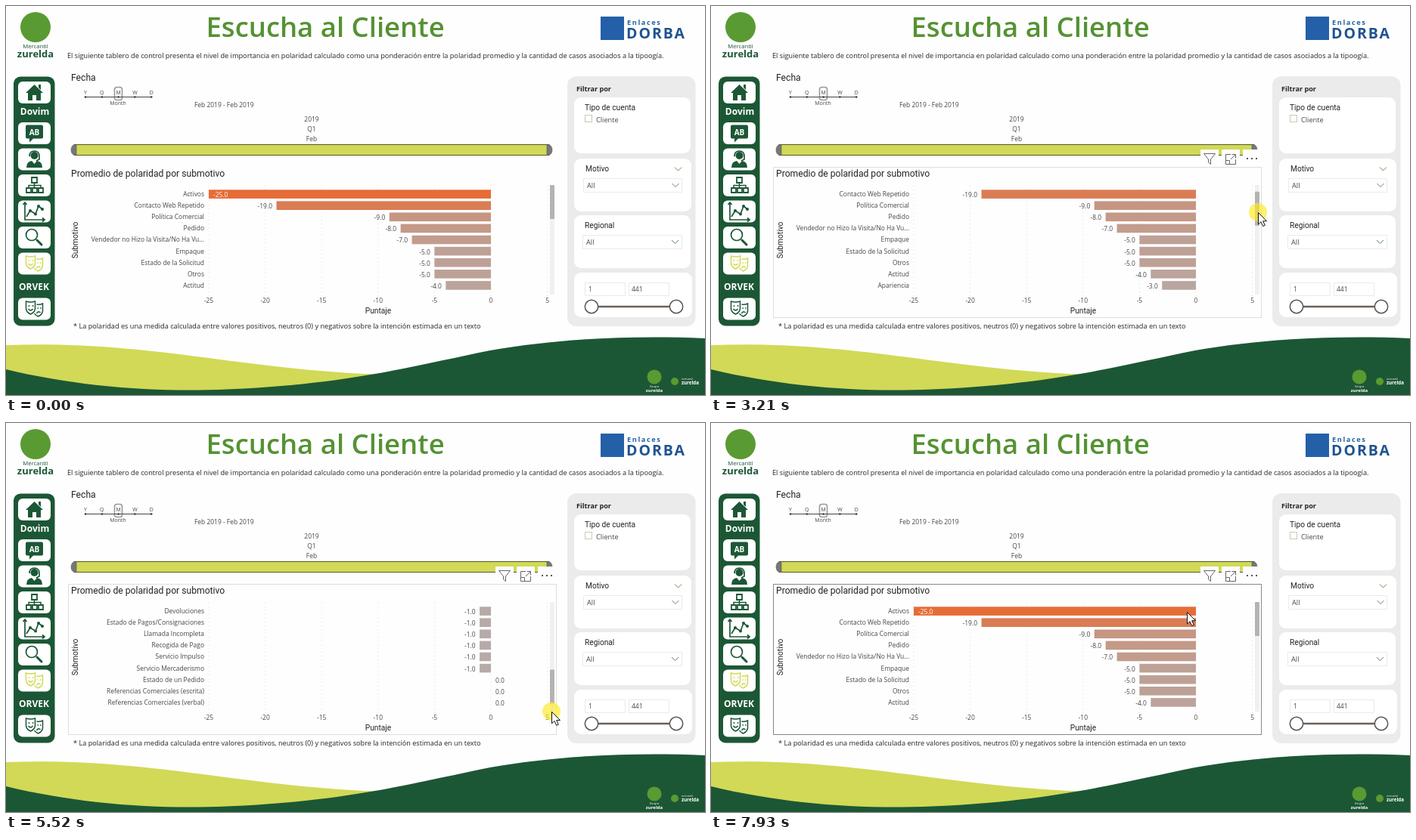
An HTML page that plays this animation: 924x515 px, repeating every 8 s.

```html
<!DOCTYPE html>
<html lang="es">
<head>
<meta charset="utf-8">
<title>Escucha al Cliente</title>
<style>
  html, body { margin: 0; width: 100%; height: 100%; overflow: hidden; background: #fefefe; }
  svg { display: block; width: 100vw; height: 100vh; }
  text { font-family: "Open Sans", "Noto Sans", sans-serif; fill: #252423; }
  .din { font-family: Roboto, "Liberation Sans", sans-serif; font-size: 10.2px; }
  .head { font-size: 12.15px; }
  .small { font-size: 8.45px; fill: #484644; }
  .tiny { font-size: 6.9px; fill: #484644; }
  .note { font-size: 9.16px; }
  .item { font-size: 9.2px; fill: #484644; }
  .bold { font-weight: 700; }
  .mid { text-anchor: middle; }
  .end { text-anchor: end; }
  .white { fill: #fff; }
  .line { fill: none; stroke-width: 1; }
</style>
</head>
<body>
<svg viewBox="0 0 924 515" preserveAspectRatio="none">
  <path fill="#d1d957" d="M0 449C110 445 200 457 290 469C360 478 430 486 500 488V515H0Z"/>
  <path fill="#1c5735" d="M0 481C90 503 190 511 280 508C450 502 540 476 640 456C730 440 830 436 924 440V515H0Z"/>

  <!-- brand blocks -->
  <circle cx="39" cy="28" r="20" fill="#5a9a32"/>
  <text class="mid" x="39" y="56" font-size="7.7" style="fill:#1c5735">Mercantil</text>
  <text class="mid bold" x="39" y="68" font-size="13" style="fill:#1c5735">zurelda</text>
  <rect x="786" y="14" width="31" height="31" fill="#2460a8"/>
  <text class="bold" x="821" y="25" font-size="9.2" letter-spacing="1.6" style="fill:#2460a8">Enlaces</text>
  <text class="bold" x="820" y="43" font-size="19.5" letter-spacing="2" style="fill:#1f5391">DORBA</text>
  <circle cx="857" cy="491" r="9.5" fill="#5a9a32"/>
  <text class="mid white" x="857" y="505" font-size="4.2">Grupo</text>
  <text class="mid bold white" x="857" y="511" font-size="6">zurelda</text>
  <circle cx="884" cy="497" r="5" fill="#5a9a32"/>
  <text class="white" x="893" y="495" font-size="3.4">mercantil</text>
  <text class="bold white" x="893" y="501" font-size="6.2">zurelda</text>

  <text x="264.5" y="41" font-size="36.5" font-weight="600" style="fill:#559233">Escucha al Cliente</text>
  <text x="81" y="69" font-size="9.2">El siguiente tablero de control presenta el nivel de importancia en polaridad calculado como una ponderación entre la polaridad promedio y la cantidad de casos asociados a la tipoogía.</text>

  <!-- navigation -->
  <rect x="10" y="93.5" width="54.5" height="330" rx="9" fill="#1c5735"/>
  <g id="buttons" fill="#fff"></g>
  <text class="mid bold white" x="38" y="144" font-size="12">Dovim</text>
  <text class="mid bold white" x="37" y="376" font-size="12">ORVEK</text>
  <g fill="#1c5735">
    <path d="M26 115L37.5 104L49 115H46V125H40V118H35V125H29V115ZM43 104H46V111L43 108Z"/>
    <path d="M28 157.500H47Q49 157.500 49 159.500V173.500Q49 175.500 47 175.500H36L31 180.500V175.500H28Q26 175.500 26 173.500V159.500Q26 157.500 28 157.500Z"/>
    <circle cx="37.500" cy="198" r="5"/>
    <path d="M27 214Q27 206 34 205L37.500 209L41 205Q48 206 48 214Z"/>
    <path d="M34 227H41V234H34ZM27 241H33V247H27ZM35 241H41V247H35ZM43 241H49V247H43Z" fill="#fff" stroke="#1c5735" stroke-width="1.800"/>
    <path class="line" stroke="#1c5735" style="stroke-width:1.500" d="M37.500 234V241M30 241V237.500H46V241"/>
    <path class="line" stroke="#1c5735" style="stroke-width:1.700" d="M25 260V283H51M22.500 263L25 260L27.500 263M48 280.500L51 283L48 285.500M27 279L32 271L39 275.500L43 265L48 269M31 199Q31 192 37.500 192Q44 192 44 199V203L40 205"/>
    <circle cx="32" cy="271" r="2"/><circle cx="39" cy="275.500" r="2"/><circle cx="43" cy="265" r="2"/><circle cx="48" cy="269" r="2"/>
    <circle cx="34" cy="303" r="7.500" fill="#fff" stroke="#1c5735" stroke-width="1.700"/>
    <path stroke="#1c5735" stroke-width="3" stroke-linecap="round" d="M41 310L47 316"/>
  </g>
  <text class="mid bold white" x="37.500" y="170.500" font-size="10">AB</text>
  <g id="masks"></g>

  <!-- date slicer -->
  <text class="din head" x="86" y="99">Fecha</text>
  <rect class="line" x="143.500" y="107.500" width="10" height="17" rx="3" stroke="#999" style="stroke-width:1.600"/>
  <path class="line" stroke="#444" d="M105 120.500H192"/>
  <g id="levels"></g>
  <text class="tiny mid" x="148" y="131">Month</text>
  <text class="small" x="249" y="134">Feb 2019 - Feb 2019</text>
  <text class="small mid" x="404" y="153">2019</text>
  <text class="small mid" x="404" y="166">Q1</text>
  <text class="small mid" x="404" y="179">Feb</text>
  <rect x="90" y="183.500" width="628" height="14" fill="#d1d957" stroke="#525a2c"/>
  <path fill="#777" stroke="#555" stroke-width=".6" d="M93 183.500V197.500Q86 197.500 86 190.500Q86 183.500 93 183.500ZM715 183.500V197.500Q722 197.500 722 190.500Q722 183.500 715 183.500Z"/>

  <!-- filters -->
  <rect x="742" y="93" width="169.500" height="331" rx="12" fill="#ebebeb"/>
  <g fill="#fff">
    <rect x="751" y="121" width="154" height="74" rx="9"/>
    <rect x="751" y="202" width="155" height="70" rx="9"/>
    <rect x="751" y="277" width="154" height="70" rx="9"/>
    <rect x="751" y="353" width="156" height="59" rx="9"/>
  </g>
  <text class="bold" x="754" y="113" font-size="9.1">Filtrar por</text>
  <text class="din" x="765" y="138">Tipo de cuenta</text>
  <rect class="line" x="765.500" y="144.500" width="9" height="9" stroke="#c9cbb4"/>
  <text class="item" x="780" y="154">Cliente</text>
  <text class="din" x="766" y="219">Motivo</text>
  <text class="din" x="765" y="294">Regional</text>
  <path class="line" stroke="#eaeaea" d="M763.500 228.500H893.500V246.500H763.500ZM762.500 303.500H893.500V321.500H762.500ZM765.500 366.500H818.500V383.500H765.500ZM823.500 366.500H876.500V383.500H823.500Z"/>
  <path class="line" stroke="#6f8a4c" d="M884 213.500L888.500 218L893 213.500"/>
  <path class="line" stroke="#5b7f95" d="M880.500 235L885 239.500L889.500 235M880 310L884.500 314.500L889 310"/>
  <text class="item" x="768" y="241">All</text>
  <text class="item" x="767" y="316">All</text>
  <text class="small" x="770" y="378">1</text>
  <text class="small" x="827" y="378">441</text>
  <path stroke="#6b6259" stroke-width="2.400" d="M774 398H886"/>
  <g fill="#fff" stroke="#555" stroke-width="1.500"><circle cx="774" cy="398" r="8.700"/><circle cx="886" cy="398" r="8.700"/></g>

  <!-- chart -->
  <g id="hover">
    <rect id="border" class="line" x="82.500" y="213.500" width="645" height="199"/>
    <path fill="#fefefe" d="M647 190H671V213H647ZM675 190H699V213H675ZM703 190H727V213H703Z"/>
    <path class="line" stroke="#666" d="M651.500 195.500H666.500L660.500 203V209.500L657.500 207V203ZM687 196.500H680.500V209.500H693.500V203M688.500 196.500H693.500V201.500M693.500 196.500L687 203M680.500 204.500H685.500V209.500"/>
    <path fill="#555" d="M708 201h2v2h-2zM714 201h2v2h-2zM720 201h2v2h-2z"/>
  </g>
  <text class="din head" x="86" y="226">Promedio de polaridad por submotivo</text>
  <text class="din mid" transform="translate(95 310) rotate(-90)">Submotivo</text>
  <text class="din mid" x="492" y="407">Puntaje</text>
  <text class="note" x="89" y="427">* La polaridad es una medida calculada entre valores positivos, neutros (0) y negativos sobre la intención estimada en un texto</text>
  <g id="axis"></g>
  <g id="rows"></g>
  <rect x="719" y="237" width="6" height="145" fill="#f0f0ee"/>
  <rect id="thumb" x="719" width="6" height="45" rx="1" fill="#b5b3b2"/>

  <g id="cursor">
    <circle id="press" r="12" fill="#fdea20" fill-opacity=".65"/>
    <path d="M.5 .5V16L4 12.700L6.700 18.500L9.300 17.300L6.700 11.700H11.500Z" fill="#fff" stroke="#111" stroke-linejoin="round"/>
  </g>
</svg>
<script>
const LOOP = 8000, VISIBLE = 9, ZERO = 641, UNIT = 14.92;
const GRAB_Y = 262, ROW_DRAG = 5.25, LAG = 30;
const $ = id => document.getElementById(id);

const items = [
  [-25, 'Activos'], [-19, 'Contacto Web Repetido'], [-9, 'Política Comercial'], [-8, 'Pedido'],
  [-7, 'Vendedor no Hizo la Visita/No Ha Vu...'], [-5, 'Empaque'], [-5, 'Estado de la Solicitud'],
  [-5, 'Otros'], [-4, 'Actitud'], [-3, 'Apariencia'], [-3, 'Faltante'], [-2, 'Campaña/Promoción'],
  [-2, 'Despacho de Producto Vencido o Cor...'], [-2, 'Envase'], [-1, 'Baja rotación en punto de venta'],
  [-1, 'Características Sensoriales'], [-1, 'Devolución de Activo'], [-1, 'Devoluciones'],
  [-1, 'Estado de Pagos/Consignaciones'], [-1, 'Llamada Incompleta'], [-1, 'Recogida de Pago'],
  [-1, 'Servicio Impulso'], [-1, 'Servicio Mercaderismo'], [0, 'Estado de un Pedido'],
  [0, 'Referencias Comerciales (escrita)'], [0, 'Referencias Comerciales (verbal)']
];

// Pointer path: time, x, y
const path = [
  [600, 860, 440], [1050, 709, 354], [1280, 709, 354], [1820, 725, 268], [1970, 725, 268],
  [2050, 723, 262], [3060, 723, 262], [3210, 723, 273], [3750, 723, 303], [4130, 723, 303],
  [4210, 723, 305], [4820, 721.5, 351], [4980, 721, 354], [5060, 721, 354], [5590, 721, 386],
  [6080, 721, 386], [6290, 716, 352], [6320, 715, 342], [6850, 713, 262], [6930, 712, 262],
  [7250, 696, 253], [7770, 696, 253], [7930, 629, 250]
];

const text = (x, y, cls, s) => `<text x="${x}" y="${y}" class="${cls}">${s}</text>`;
const mix = (a, b, k) => a + (b - a) * k;
const barColor = v => `rgb(${[[180, 174, 174], [230, 108, 55]]
  .reduce((a, b) => a.map((c, i) => Math.round(mix(c, b[i], -v / 25))))})`;

function pointerAt(t) {
  const i = path.findIndex(p => p[0] > t);
  if (i === 0) return path[0].slice(1);
  if (i < 0) return path[path.length - 1].slice(1);
  const [a, b] = [path[i - 1], path[i]], k = (t - a[0]) / (b[0] - a[0]);
  return [mix(a[1], b[1], k), mix(a[2], b[2], k)];
}

function row([value, name], i) {
  const y = 249 + i * 15.1, x = ZERO + value * UNIT;
  const label = value === -25 ? [x + 6, 'small white'] : value ? [x - 5.5, 'small end'] : [ZERO + 6, 'small'];
  return text(262, y + 3, 'small end', name)
    + `<rect x="${x}" y="${y - 5.7}" width="${ZERO - x}" height="11.6" fill="${barColor(value)}"/>`
    + text(label[0], y + 4, label[1], value.toFixed(1));
}

const mask = (y, color) => `<g transform="translate(37.5 ${y})" class="line" stroke="${color}" style="stroke-width:1.5">
  <path d="M-11 -10Q-5 -8 1 -10V0Q0 5 -5 7Q-10 5 -11 0ZM3 -6Q7 -5 11 -7V3Q10 8 5 10Q1 8 0 6"/>
  <path d="M-8 -4h2M-3 -4h2M-8 0Q-5 4 -2 0M4 -1h1.5M7.5 -1h1.5M3 6Q5.5 2 8 5"/></g>`;

$('buttons').innerHTML = [100, 154, 188.5, 223, 257.5, 292, 326.5, 386.5]
  .map(y => `<rect x="16" y="${y}" width="43" height="29" rx="6"/>`).join('');
$('masks').innerHTML = mask(341, '#d1d957') + mask(401, '#1c5735');
$('levels').innerHTML = [...'YQMWD'].map((c, i) => {
  const x = 105 + i * 21.8;
  return text(x, 117, 'tiny mid', c) + `<circle cx="${x}" cy="120.5" r="1.3" fill="#333"/>`;
}).join('');
$('axis').innerHTML = [-25, -20, -15, -10, -5, 0, 5].map(v => {
  const x = ZERO + v * UNIT;
  return `<path class="line" stroke="#dedede" stroke-dasharray="1 4" d="M${x} 238V384"/>` + text(x, 393, 'small mid', v);
}).join('');

let shownOffset = -1;

function draw(t) {
  const [x, y] = pointerAt(t);
  const dragging = t >= 2660 && t < 6930;
  const clicking = t >= 7320 && t < 7550;
  const drag = dragging ? Math.max(0, Math.min(89.5, pointerAt(t - LAG)[1] - GRAB_Y)) : 0;
  const offset = Math.floor(drag / ROW_DRAG);

  $('cursor').style.display = t >= 600 ? '' : 'none';
  $('cursor').setAttribute('transform', `translate(${x} ${y})`);
  $('press').style.display = dragging || clicking ? '' : 'none';
  $('hover').style.display = t >= 600 && x < 728 && y < 413 ? '' : 'none';
  $('border').setAttribute('stroke', t >= 7550 ? '#8a8886' : '#dedede');
  $('thumb').setAttribute('y', 237 + drag);
  if (offset !== shownOffset) {
    shownOffset = offset;
    $('rows').innerHTML = items.slice(offset, offset + VISIBLE).map(row).join('');
  }
}

const start = performance.now();
function frame() {
  draw((performance.now() - start) % LOOP);
  requestAnimationFrame(frame);
}
frame();
</script>
</body>
</html>
```
